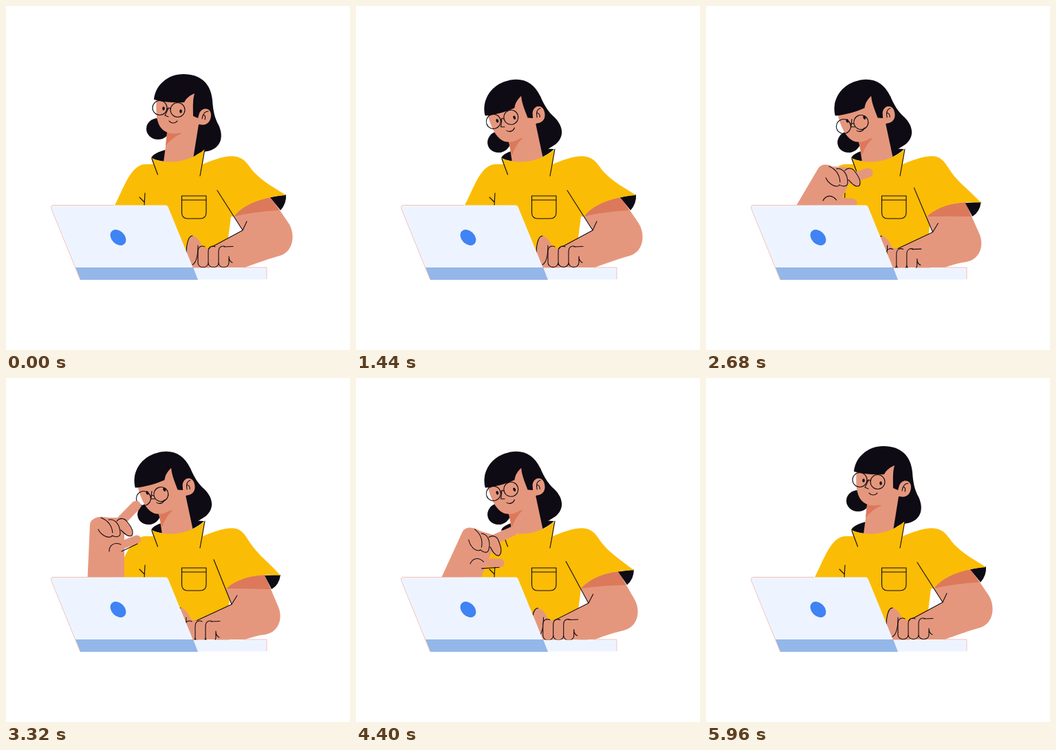
Write an HTML page that moves like this. It is 500 px wide and 500 px high and loops after 6000 ms.

```html
<!DOCTYPE html>
<html lang="en">
<head>
<meta charset="utf-8">
<title>Working at a laptop</title>
<style>
  html, body { margin: 0; width: 100%; height: 100%; overflow: hidden; background: #fff; }
  svg { display: block; width: 100%; height: 100%; }
  .ink { fill: none; stroke: #0e0b14; stroke-width: 1.1; stroke-linecap: round; stroke-linejoin: round; }
  .hair { fill: #0e0b14; }
  .skin { fill: #e5977d; }
  .shade { fill: #dc795b; }
  .shirt { fill: #fbbc05; }
  .digit { fill: none; stroke: #e5977d; stroke-linecap: round; }
  .pale { fill: #eef4ff; }
  .rim { fill: none; stroke: #f2b5aa; stroke-width: .8; }
</style>
</head>
<body>
<svg viewBox="0 0 500 500">
  <clipPath id="aboveLaptop"><path d="M0 0H500V395H278L235 291H0Z"/></clipPath>
  <clipPath id="aboveDesk"><path d="M0 0H500V380.500H0Z"/></clipPath>

  <path class="hair" d="M211 221C215 212 235 207 255 206L288 208C266 228 235 231 211 221Z"/>
  <g class="head">
    <path class="hair" d="M270 130L300 137C301 152 303 162 309 173C316 188 314 204 297 210C287 213 279 211 272 222L262 180Z"/>
    <ellipse class="hair" cx="221" cy="178.500" rx="17" ry="15.500"/>
  </g>
  <path id="neck" class="skin"/>
  <g class="head">
    <path class="shade" d="M234 183L256 185Q243 190 232 203Z"/>
    <path class="skin" d="M219 134C217 155 219 170 226 178C234 187 248 187 257 182L281 172C292 175 298 168 298 158C298 148 285 146 281 154L276 125Z"/>
    <path class="hair" d="M215 136C217 115 235 99 258 99C283 99 298 113 300 137L299 154C293 146 284 149 281 156L279 163L272 160C272 148 271 138 274 127C267 130 262 134 259 140C245 141 230 140 215 136Z"/>
    <path class="ink" d="M285 164C286 156 289 153 294 153M287 158Q291 160 289 165M236 149L231 159L236 161M237 167C240 171 246 171 249 167"/>
    <ellipse class="hair" cx="229" cy="149" rx="1.800" ry="2.800"/>
    <ellipse class="hair" cx="254" cy="153" rx="1.800" ry="2.800"/>
    <g id="glasses" class="ink">
      <circle cx="223.500" cy="148" r="10.500"/>
      <circle cx="249.500" cy="151" r="10.500"/>
      <path d="M234 150Q237 146 239 150"/>
    </g>
  </g>

  <path class="shirt" d="M157 292C172 262 182 230 203 230L214 230L211 221C235 231 266 228 289 208L286 230L335 260L331 306L327 306L322 345L280 381H230L200 292Z"/>
  <path id="arm" class="skin"/>
  <path id="armShade" class="shade"/>
  <path id="cuff" class="hair"/>
  <path id="sleeve" class="shirt"/>
  <path id="armLines" class="ink"/>
  <path class="ink" d="M212 222L220.500 245M289 208L282 247M194 278L201 285M202 272L201 290M255.500 276H291V300Q291 309 282 309H264Q255.500 309 255.500 300ZM255.500 282H291"/>

  <path class="pale" d="M265 380H379V397.500H265Z"/>
  <path class="rim" d="M345 380H379V397"/>
  <g clip-path="url(#aboveDesk)">
    <g id="thumb">
      <path id="thumbSkin" class="skin"/>
      <path id="thumbLine" class="ink"/>
    </g>
    <g id="fingers">
      <path id="fingerSkin" class="skin"/>
      <path id="fingerLines" class="ink"/>
    </g>
  </g>

  <g clip-path="url(#aboveLaptop)">
    <g id="hand">
      <path class="digit" stroke-width="14" d="M168 207L189 185.500"/>
      <path class="skin" d="M115 370L122 213C123 205 132 201 141 202L160 204L172 216V370Z"/>
      <path class="digit" stroke-width="12" d="M163 245L190 234.500"/>
      <path class="ink" d="M150 252C150 243 157 238 167 242M168 252L191 241"/>
      <g id="fist">
        <path class="skin" d="M133 220L138 203L165 203C173 203 186 219 184 228C181 232 174 229 167 222C168 231 160 233 154 229C148 234 138 228 133 220Z"/>
        <path class="ink" d="M138 203C148 207 154 215 155 225M134 220C138 228 148 234 154 230M149 206C158 204 166 213 166 226C166 231 160 232 154 229M161 208C165 203 172 203 176 209C182 216 186 224 183 229C178 232 172 226 167 221"/>
      </g>
    </g>
  </g>

  <path class="pale" d="M70 289.500H232Q235 289.500 236 293L279 398H108L66 295Q64 289.500 70 289.500Z"/>
  <path fill="#93b7e8" d="M101 380H272L279 398H108Z"/>
  <path class="rim" d="M108 398L66 295Q64 289.500 70 289.500H157"/>
  <ellipse cx="163" cy="336.500" rx="13" ry="9.500" fill="#3f83f4" transform="rotate(45 163 336.500)"/>
</svg>
<script>
const LOOP = 6000;
const NECK = { x: 268, y: 225 };
const $ = id => document.getElementById(id);
const heads = document.querySelectorAll('.head');

const lerp = (a, b, t) => a + (b - a) * t;
const ease = (t, from, to) => {
  const p = Math.min(1, Math.max(0, (t - from) / (to - from)));
  return p < .5 ? 4 * p ** 3 : 1 - 4 * (1 - p) ** 3;
};
const pulse = (t, a, b, c, d) => ease(t, a, b) - ease(t, c, d);

// Blends two paths that share the same commands.
function morph(a, b, t) {
  const end = b.match(/[\d.]+/g);
  let i = 0;
  return a.replace(/[\d.]+/g, n => lerp(+n, +end[i++], t).toFixed(2));
}

// Typing pose and reaching pose of the arm on the keyboard.
const POSES = {
  arm: [
    'M331 306L385 278L411 316C421 332 418 357 398 363C384 367 368 372 345 381L285 381L292 354L344 326Z',
    'M320 306L376 286L396 333C403 350 396 370 376 373C366 374 356 377 345 381L275 381L274 354L328 329Z'],
  armShade: [
    'M331 306C345 288 365 281 385 278L397 297Q360 299 331 306Z',
    'M320 306C333 294 350 287 376 286L385 307Q352 306 320 306Z'],
  cuff: [
    'M384 278L407 274Q408 287 399 297Z',
    'M376 287L399 286Q397 301 386 307Z'],
  sleeve: [
    'M286 230C300 224 322 216 335 219C350 223 352 233 362 243C373 255 390 264 407 275C380 277 348 285 331 306L307 268Z',
    'M286 230C300 224 322 216 335 219C347 223 350 234 358 244C369 259 380 266 399 287C365 284 338 290 320 306L302 264Z'],
  armLines: [
    'M307 268L344 326L294 353M350 313L344 326',
    'M302 264L328 329L274 354M336 316L328 329']
};

// Raised hand: time, x, y, angle, finger angle.
const REACH = [
  [2080, 165, 365, 60, -25], [2680, 170, 283, 28, -25], [3240, 150, 252, 0, 0], [3480, 150, 252, 0, 0],
  [3700, 151, 247, 0, 0], [3880, 150, 250, 0, 0], [4400, 166, 270, 22, -5], [5040, 182, 335, 50, -5],
  [5360, 165, 365, 60, -5]
];

function reachAt(t) {
  const last = REACH.length - 1;
  if (t <= REACH[0][0]) return REACH[0].slice(1);
  if (t >= REACH[last][0]) return REACH[last].slice(1);
  const i = REACH.findIndex(k => k[0] > t) - 1;
  const a = REACH[i], b = REACH[i + 1], span = b[0] - a[0];
  const p = (t - a[0]) / span;
  const slope = (k, c) => {
    if (k === 0 || k === last) return 0;
    const before = REACH[k][c] - REACH[k - 1][c], after = REACH[k + 1][c] - REACH[k][c];
    return before * after <= 0 ? 0 : (before + after) / (REACH[k + 1][0] - REACH[k - 1][0]) * span;
  };
  return [1, 2, 3, 4].map(c =>
    (2 * p ** 3 - 3 * p ** 2 + 1) * a[c] + (p ** 3 - 2 * p ** 2 + p) * slope(i, c) +
    (3 * p ** 2 - 2 * p ** 3) * b[c] + (p ** 3 - p ** 2) * slope(i + 1, c));
}

function turn(x, y, degrees) {
  const r = degrees * Math.PI / 180, dx = x - NECK.x, dy = y - NECK.y;
  return `${NECK.x + dx * Math.cos(r) - dy * Math.sin(r)} ${NECK.y + dx * Math.sin(r) + dy * Math.cos(r)}`;
}

function drawHead(t) {
  const angle = -20 * pulse(t, 400, 1440, 4800, 5940);
  heads.forEach(h => h.setAttribute('transform', `rotate(${angle} ${NECK.x} ${NECK.y})`));
  $('neck').setAttribute('d',
    `M${turn(235, 182, angle)}L228 234L271 232L272 222L${turn(280, 172, angle)}L${turn(262, 165, angle)}Z`);
  const slip = pulse(t, 2000, 2560, 3480, 3880);
  $('glasses').setAttribute('transform', `translate(${-2.4 * slip} ${6.8 * slip})`);
}

function drawTypingHand(t, reach) {
  const beat = (1 - reach) * (1 - Math.cos(2 * Math.PI * t / 500));
  const top = 334 + 1.2 * beat;
  const thumb = `M262 362C262 343 266 ${top} 271 ${top}`;
  $('thumbSkin').setAttribute('d', `${thumb}C279 ${top + 1} 283 345 286 351L296 353V381H262Z`);
  $('thumbLine').setAttribute('d', thumb + 'M279 348C279 360 277 373 271 376');
  $('thumb').setAttribute('transform', `translate(${-17 * reach} 0)`);

  let skin = 'M279 356Q281 348 294 353L328 349L345 380L310 378Z', lines = '';
  [279, 294, 309].forEach((x, i) => {
    const low = 373 - beat * (i % 2 ? 1 : .5);
    const cap = `M${x} 357C${x} 349 ${x + 6} 348 ${x + 10} 350`;
    const side = `M${x} 357V${low}C${x} ${low + 9} ${x + 15} ${low + 9} ${x + 15} ${low}`;
    skin += `${side}V352L${x + 4} 350Z`;
    lines += cap + side + (i < 2 ? 'V357' : 'V364');
  });
  $('fingerSkin').setAttribute('d', skin);
  $('fingerLines').setAttribute('d', lines + 'M317 350L330 349.5M324 364Q324 371 329 373');
  $('fingers').setAttribute('transform', `translate(${-19 * reach} ${4 * reach})`);
}

function draw(t) {
  drawHead(t);
  const reach = pulse(t, 2140, 2900, 3880, 4840);
  for (const id in POSES) $(id).setAttribute('d', morph(...POSES[id], reach));
  drawTypingHand(t, reach);
  const [x, y, angle, fist] = reachAt(t);
  $('hand').setAttribute('transform', `translate(${x} ${y}) rotate(${angle}) translate(-150 -252)`);
  $('fist').setAttribute('transform', `rotate(${fist} 138 211)`);
}

const start = performance.now();
function tick() {
  draw((performance.now() - start) % LOOP);
  requestAnimationFrame(tick);
}
tick();
</script>
</body>
</html>
```
